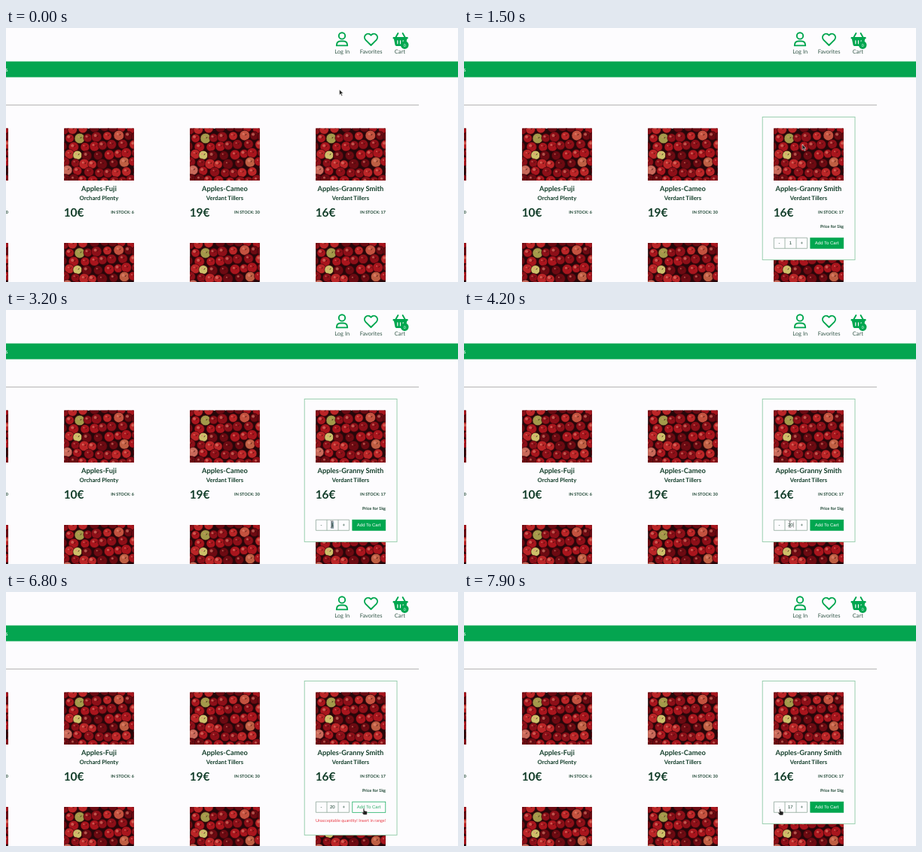
Recreate the animation shown at these times as an HTML page. Size 600 by 338 pixels, loop 8000 ms.

```html
<!DOCTYPE html>
<html lang="en">
<head>
<meta charset="utf-8">
<title>Fruit shop</title>
<style>
  html, body { margin: 0; width: 100%; height: 100%; overflow: hidden; background: #fdfcfe; }
  svg { display: block; }
  #stage { width: 100%; height: 100%; }
  text { font-family: Lato, sans-serif; fill: #143f2b; text-rendering: geometricPrecision; }
  .bold { font-weight: 700; }
  .mid { text-anchor: middle; }
  .end { text-anchor: end; }
  .nav { font-size: 7.5px; fill: #35594a; text-anchor: middle; }
  .ui { font: 6px "Liberation Sans", Arial, sans-serif; text-anchor: middle; }
  .line { fill: none; stroke: #00a64f; stroke-width: 1.9; stroke-linejoin: round; stroke-linecap: round; }
</style>
</head>
<body>
<svg id="stage" viewBox="0 0 600 338" preserveAspectRatio="none">
  <defs>
    <symbol id="photo" viewBox="0 0 92.7 69.5"><rect width="93" height="70" fill="#26070a"/><g id="apples"></g></symbol>
  </defs>
  <rect width="600" height="338" fill="#fdfcfe"/>

  <g class="line">
    <circle cx="446" cy="10.4" r="4.2"/>
    <path d="M438.8 23.4q0-5.9 5.4-5.9h3.6q5.4 0 5.4 5.9z"/>
    <path d="M484.5 23l-7.2-7.1c-4.2-4.8 2.3-11.4 7.2-6.2c4.9-5.2 11.4 1.4 7.2 6.2z"/>
    <path d="M517 13l3.4-6M530 13l-3.4-6"/>
  </g>
  <path d="M514 12h19.2q1.2 1.3 0 2.6h-.9l-1.6 8q-.3 1.4-1.7 1.4h-10.8q-1.4 0-1.7-1.4l-1.6-8h-.9q-1.2-1.3 0-2.6z" fill="#00a64f"/>
  <path d="M519.8 16.8v4M523.5 16.8v4M527.2 16.8v2" stroke="#fdfcfe" stroke-width="1.2" stroke-linecap="round"/>
  <circle cx="529.2" cy="22.6" r="5.3" fill="#00a64f"/>
  <text x="529.2" y="24.6" class="mid" font-size="5.2" style="fill:#fff">0</text>
  <text x="446.2" y="33.8" class="nav">Log In</text>
  <text x="484.6" y="33.8" class="nav">Favorites</text>
  <text x="522.8" y="33.8" class="nav">Cart</text>

  <rect y="44.5" width="600" height="21" fill="#04a550"/>
  <text x="2.6" y="58" class="end" font-size="7.5" style="fill:#fff">s</text>
  <path d="M0 102.5H548" stroke="#b4b4b4"/>

  <g id="lower"></g>
  <rect id="card" x="396.2" y="118.4" width="122.8" height="190" fill="#fdfcfe" stroke="#8fcaa6" stroke-width=".9"/>
  <g id="upper"></g>

  <g id="panel">
    <text x="504" y="266" class="end bold" font-size="5.5">Price for 1kg</text>
    <path d="M411.4 279.2h44.2v14.1h-44.2zM426 279.2v14.1M441 279.2v14.1" fill="none" stroke="#8fa79a" stroke-width=".8"/>
    <rect id="mark" x="431.2" y="281.3" width="4" height="9.6" fill="#8fa6ad"/>
    <text id="minus" x="418.6" y="288.2" class="ui">-</text>
    <text id="count" x="433.3" y="288.3" class="ui"></text>
    <text id="plus" x="448.2" y="288.3" class="ui">+</text>
    <path id="caret" d="M437.3 282.5v7" stroke="#333" stroke-width=".5"/>
    <rect id="add" x="459.8" y="279.2" width="44" height="14.1" stroke="#00a64f" stroke-width=".7"/>
    <text id="addText" x="481.6" y="288.2" class="ui">Add To Cart</text>
    <text id="error" x="457.6" y="306.3" class="mid" font-size="5.5" style="fill:#e8343f">Unacceptable quantity! Insert in range!</text>
  </g>

  <g id="pointer" stroke="#fff" stroke-width=".5" stroke-linejoin="round">
    <path id="arrow" d="M0 0v7.2l1.7-1.6 1.3 2.8 1.2-.6-1.3-2.7h2.3z" fill="#222"/>
    <path id="beam" d="M-1.7-4.4q1.7 0 1.7.9q0-.9 1.7-.9M0-3.6v7.2M-1.7 4.4q1.7 0 1.7-.9q0 .9 1.7.9" fill="none" stroke="#555" stroke-width=".7"/>
    <path id="hand" d="M-.9 0q.9-.9 1.7 0v2.6l3 .7q1 .3.8 1.5l-.6 3.2h-4.3l-2.7-3.5q.1-1.1 2.1.3z" fill="#222"/>
  </g>
</svg>
<script>
const $ = id => document.getElementById(id);
const show = (id, on) => $(id).style.display = on ? '' : 'none';
const LOOP = 8000;

// apples packed in staggered rows
const tones = ['#8d0f18', '#a9151d', '#6d0a12', '#bb2527'];
const special = { 9: '#a39a4a', 25: '#cdc069', 40: '#c9695a', 13: '#c4523f', 38: '#bf5f43' };
let apples = '';
for (let i = 0; i < 56; i++) {
  const row = i >> 3;
  const x = (i % 8) * 13 + (row % 2) * 6 + 2 * Math.sin(i * 5);
  const y = row * 11.5 + 2 * Math.cos(i * 7);
  const r = 6.3 + .6 * Math.sin(i * 3);
  apples += `<circle cx="${x}" cy="${y}" r="${r}" fill="${special[i] || tones[i * 7 % 11 % 4]}" stroke="#3a070b" stroke-width=".7"/>` +
    `<circle cx="${x - 1.6}" cy="${y - 1.9}" r="${1 + i % 3 * .5}" fill="#e98f78" opacity=".55"/>` +
    `<path d="M${x + 1} ${y}l1.3-2" stroke="#35100b" stroke-width=".8"/>`;
}
$('apples').innerHTML = apples;

const products = [
  ['', '', '', 30],
  ['Apples-Fuji', 'Orchard Plenty', '10€', 6],
  ['Apples-Cameo', 'Verdant Tillers', '19€', 30],
  ['Apples-Granny Smith', 'Verdant Tillers', '16€', 17]
];
const photo = (x, y) => `<use href="#photo" x="${x}" y="${y}" width="92.7" height="69.5"/>`;
products.forEach(([name, seller, price, stock], i) => {
  const x = 77.1 + 167 * (i - 1), mid = x + 46.3;
  $('lower').innerHTML += photo(x, 286);
  $('upper').innerHTML += photo(x, 133.5) + `
    <text x="${mid}" y="216.8" class="mid bold" font-size="9.3">${name}</text>
    <text x="${mid}" y="229.3" class="mid bold" font-size="7.7">${seller}</text>
    <text x="${x - .4}" y="250.8" class="bold" font-size="15.4">${price}</text>
    <text x="${x + 92.7}" y="247" class="end bold" font-size="5.4">IN STOCK: ${stock}</text>`;
});

// pointer moves: start, end, target x, target y
const moves = [
  [1000, 1500, 449, 155],
  [1800, 2700, 433, 286],
  [2700, 2900, 432.6, 285],
  [4400, 5300, 477, 288.5],
  [6700, 7600, 419.5, 289]
];
function pointerAt(t) {
  let x = 442.5, y = 82;
  for (const [from, to, tx, ty] of moves) {
    const p = Math.min(1, Math.max(0, (t - from) / (to - from)));
    const e = p * p * (3 - 2 * p);
    x += (tx - x) * e;
    y += (ty - y) * e;
  }
  return [x, y];
}

function draw(now) {
  const t = Math.floor(now % LOOP / 100) * 100;
  const [x, y] = pointerAt(t);
  const over = (l, r) => y > 279 && y < 293.4 && x > l && x < r;
  const onMinus = over(411, 426), onInput = over(426, 441);
  const onPlus = over(441, 455.6), onAdd = over(459.5, 504);
  const onButton = onMinus || onPlus || onAdd;
  const open = y > 118, error = t >= 5500 && t < 7800;

  show('card', open);
  show('panel', open);
  $('card').setAttribute('height', error ? 205 : 190);
  show('error', error);
  show('mark', t >= 3200 && t < 3800);
  show('caret', t >= 3900 && t < 4500);
  $('count').textContent = t < 3800 ? 1 : t < 3900 ? 2 : t < 7800 ? 20 : 17;
  $('minus').style.fill = onMinus ? '#8fcaa6' : '';
  $('plus').style.fill = onPlus ? '#8fcaa6' : '';
  $('add').style.fill = onAdd ? '#fdfcfe' : '#00a64f';
  $('addText').style.fill = onAdd ? '#2fae68' : '#fff';

  $('pointer').setAttribute('transform', `translate(${x} ${y})`);
  show('beam', onInput);
  show('hand', onButton);
  show('arrow', !onInput && !onButton);
}

const start = performance.now();
function tick() {
  draw(performance.now() - start);
  requestAnimationFrame(tick);
}
tick();
</script>
</body>
</html>
```
